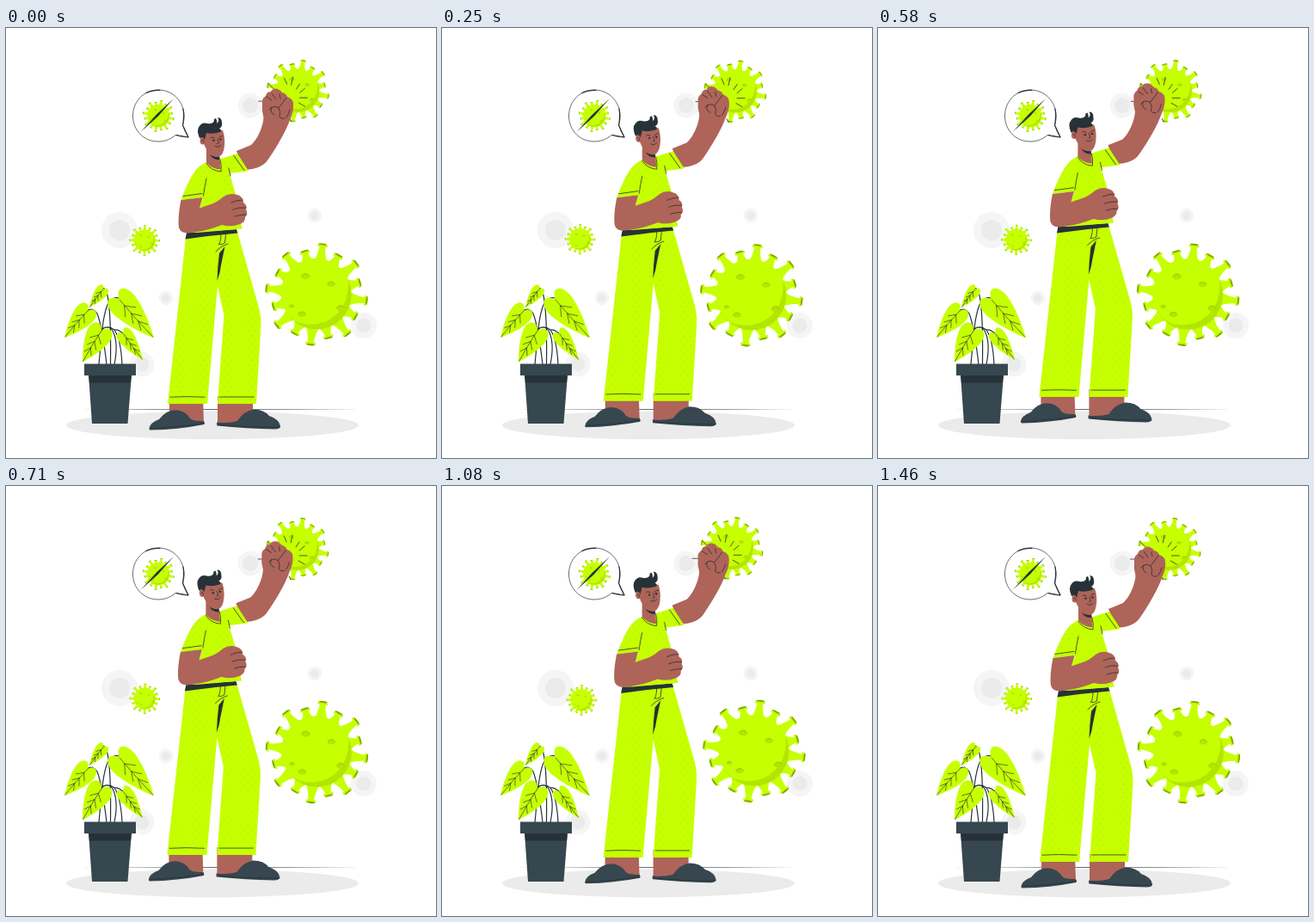
Recreate the animation shown at these times as an HTML page. Size 500 by 500 pixels, loop 1.5 s.

```html
<!DOCTYPE html>
<html lang="en">
<head>
<meta charset="utf-8">
<title>Fighting the virus</title>
<style>
html, body { margin: 0; width: 100%; height: 100%; overflow: hidden; background: #fff; }
svg { display: block; width: 100vw; height: 100vh; }
.lime { fill: #c6ff00; }
.skin { fill: #ae6459; }
.slate { fill: #37474f; }
.dark { fill: #263238; }
.line { fill: none; stroke: #263238; stroke-width: .8; stroke-linecap: round; stroke-linejoin: round; }
.bold { stroke-width: 1.2; }
.fine { stroke-width: .6; }
.shade { fill: #b2e600; }
.edge { fill: #83ac00; }
</style>
</head>
<body>
<svg viewBox="0 0 500 500" xmlns="http://www.w3.org/2000/svg">
  <defs>
    <pattern id="dots" width="8" height="10" patternUnits="userSpaceOnUse">
      <circle cx="2" cy="2" r=".5" fill="#a6d800"/>
      <circle cx="6" cy="7" r=".5" fill="#a6d800"/>
    </pattern>
  </defs>

  <ellipse cx="240" cy="462" rx="170" ry="16.3" fill="#ebebeb"/>
  <path class="dark" d="M86 443.400Q250 442.700 411 443.400Q250 444.100 86 443.400Z"/>
  <g id="bubbles"></g>

  <g id="plant">
    <path class="line bold" d="M121.500 391C122 355 121 325 118 311Q116 302 112 302.500M108 391C111 362 112 336 118 322Q124 310 135 315M117 391C114 365 111 345 106 332Q101 324 94 329M126 391C130 372 128 360 124 352Q118 344 110 352M135 391C134 372 131 358 126 351Q120 346 113 349M126 351Q130 350 136 355"/>
    <g id="leaves"></g>
    <path class="slate" d="M96 403H146L141.500 460H100Z"/>
    <path class="dark" d="M96 403H146L145 412.500H97Z"/>
    <path class="slate" d="M91 390.500H151V404H91Z"/>
  </g>

  <g>
    <path d="M205.500 113C212 92 198 72 177 72C160 72 147 86 147.500 103C148 120 161 132 177 132C185 132 192 129 197 124.500Q204 127 212 127Q208 121 205.500 113Z" fill="#fff" stroke="#263238" stroke-width=".7"/>
    <path class="line bold" d="M163 75.500Q170 72 179 72.300M206 94Q207.500 103 205.500 113L212 127L198 124.500"/>
    <g id="badge"></g>
    <path class="dark" d="M156.500 121L175 100.500L195 82L177 102.500Z"/>
  </g>

  <g id="small"></g>
  <g id="big"></g>
  <g id="top"></g>

  <g id="man">
    <path class="skin" d="M190 428H229L230 460H190ZM246 428H287V460H246Z"/>
    <path class="slate" d="M166.500 466Q167 459 178 455Q186 444.500 197 444.300Q209 445 214 454Q217 457.500 230 457Q231.500 459 230.500 461Q200 467 168 467.500Q166.500 467.500 166.500 466Z"/>
    <path class="slate" d="M245 458.500Q259 460 269 457Q277 445 288 443.500Q300 443.500 306 451Q318 455 319 463Q319 466.500 312 466.500Q280 466 245.500 462.500Z"/>
    <path class="line" d="M167.500 465.500Q200 464.500 230.500 459.500M245.500 461Q280 464.500 318.500 464"/>

    <path class="lime" d="M209 244L188 437H234L246 300L253.500 334L246 437H291L296.500 345Q297 334 292 318L269 237Z"/>
    <path fill="url(#dots)" d="M209 244L188 437H234L246 300L253.500 334L246 437H291L296.500 345Q297 334 292 318L269 237Z"/>
    <path class="dark" d="M254.500 254L248 262Q246 278 245.500 294Q249 285 250 276Z"/>
    <path class="line" d="M191 429.200Q210 428 231 429.200M248.500 429H288M250 240Q250 248 247.500 252M255.500 240L254.500 250Q249 253 248 251M244 260Q249 254 258 251"/>
    <path class="dark" d="M210 238L268 234L269.500 238.500Q240 241 208.500 245.500Z"/>

    <path class="skin" d="M299.500 104C299 115 292 130 285 136L268 143L277 165Q297 164 304 154C314 140 326 119 330 107C334 99 335 91 333.500 85Q331 81 327 80Q326 76 321 75Q318 70.500 313 70.500Q309 71 308 74Q303 74 302 79Q297 82 298 88Q297 96 299.500 104Z"/>
    <path class="line" d="M306 95Q311 89 317 93Q321 88 326 81M309 84L303 80M314 83L309 76M319 82L318 77M317 93Q320 97 318 103Q320 106 324 105M309 92Q306 98 312 101M330 95Q329 100 326 104"/>

    <path class="lime" d="M234 156C221 160 214 173 203.500 200L229 197L224 212L211 238H222L274.500 233.500L268 197L260 169L282 166L269 146L250 152Z"/>
    <path fill="url(#dots)" d="M234 156C221 160 214 173 203.500 200L229 197L224 212L211 238H222L274.500 233.500L268 197L260 169L282 166L269 146L250 152Z"/>
    <path class="line" d="M206 195.500L228 192.500M233 175Q231 184 229.500 195M265 148.500L277 165.500M259 163L261 172M233 157Q238 166 250 167Q251 160 249 153"/>
    <path class="skin" d="M203.500 200C201 212 200 224 201 232Q203 238.500 211 238.500C226 237.500 243 232.500 251 229Q262 232 272 228Q279 225 278 220Q282 216 279 211Q281 206 276 203Q276 196 269 194Q260 191 253 196Q245 203 238 205L225 209.500L228.500 197Z"/>
    <path class="line" d="M262 203Q268 200 275 200M264 211Q271 208 279 209M266 219Q272 217 279 217"/>

    <path class="skin" d="M233 140V156Q239 164 249.500 164.500L248 145Z"/>
    <path class="dark" d="M237 147Q242 151 248 149.500L248.500 153Q241 154 237 147Z"/>
    <path class="skin" d="M230 120L252 119Q255 128 254 137Q253 148 247 150Q238 150 234 142Q230 137 230 132Z"/>
    <ellipse class="skin" cx="229" cy="131" rx="3.500" ry="4.500"/>
    <path class="dark" d="M225 128Q221 118 225 114Q228 109 234 111Q240 112 242 108Q241 106 244 105Q246 109 245 111Q249 108 246 104Q251 104 251 110Q252 115 248 117Q252 119 249 121Q240 124 233 122L231 130Q229 125 226 128Z"/>
    <path class="line" d="M238 127.500Q240 126 242.500 128M247.500 127.500Q250 125 252 125.500M246 129L247.500 134L245.500 134.500M243 137.500Q247 140 250 136M228 130Q230 130 230 133"/>
    <circle class="dark" cx="241.500" cy="130.800" r="1.200"/>
    <circle class="dark" cx="249.500" cy="129.500" r="1.200"/>
  </g>
</svg>
<script>
const LOOP = 1500;
const $ = id => document.getElementById(id);

const spike = (angle, len) => `<g transform="rotate(${angle})">
  <path class="lime" d="M36 -10Q42 -4.500 ${len - 4} -3.400L${len - 3.5} -6Q${len} -7 ${len} 0Q${len} 7 ${len - 3.5} 6L${len - 4} 3.400Q42 4.500 36 10Z"/>
  <ellipse class="edge" cx="${len - .7}" cy="0" rx="1.100" ry="5"/></g>`;

const spot = (x, y, r) => `<ellipse class="shade" cx="${x}" cy="${y}" rx="${r}" ry="${r * .65}"/>
  <path d="M${x - r} ${y}Q${x} ${y - r * 1.3} ${x + r} ${y}" fill="none" stroke="#94bf00" stroke-width=".8"/>`;

// Centred on 0,0 with long and short spikes in turn
function virus(scale, turn) {
  let s = `<g transform="scale(${scale}) rotate(${turn})">`;
  for (let i = 0; i < 16; i++) s += spike(7 + i * 22.5, i % 2 ? 53 : 59.5);
  s += `<circle class="shade" r="40.500"/>
    <path class="lime" d="M37 -16A40.500 40.500 0 1 0 -25 31Q-8 39 12 31Q38 18 37 -16Z"/>`;
  return s + spot(-13, -21, 5) + spot(17, -12, 4.5) + spot(-17, 23, 4.5) + spot(28, 16, 5) + spot(-29, 14, 3) + '</g>';
}

// Heart-shaped leaf from stem (x, y) to tip (u, v)
function leaf(x, y, u, v, w) {
  const len = Math.hypot(u - x, v - y), a = Math.atan2(v - y, u - x) * 180 / Math.PI;
  const at = k => len * k;
  let veins = `M0 0Q${at(.5)} 1 ${at(.97)} 0`;
  for (const k of [.15, .35, .55]) {
    const h = w * (.6 - k * .5);
    veins += `M${at(k)} .500L${at(k + .17)} ${h}M${at(k)} .500L${at(k + .17)} ${-h}`;
  }
  return `<g transform="translate(${x} ${y}) rotate(${a})">
    <path class="lime" d="M0 0C${at(-.28)} ${-w * .4} ${at(-.12)} ${-w * 1.3} ${at(.25)} ${-w}C${at(.55)} ${-w * .8} ${at(.8)} ${-w * .35} ${len} 0C${at(.8)} ${w * .35} ${at(.55)} ${w * .8} ${at(.25)} ${w}C${at(-.12)} ${w * 1.3} ${at(-.28)} ${w * .4} 0 0Z"/>
    <path class="line fine" d="${veins}"/></g>`;
}

$('bubbles').innerHTML = [[132, 235, 21, 12], [284, 90, 14.5, 9], [359, 218, 8.5, 5],
  [186, 314, 8.5, 5], [158, 391, 14.5, 8.5], [416, 346, 15, 8.5]]
  .map(([x, y, r, q]) => `<circle cx="${x}" cy="${y}" r="${r}" fill="#f5f5f5"/><circle cx="${x}" cy="${y}" r="${q}" fill="#ebebeb"/>`).join('');

$('leaves').innerHTML = leaf(113, 304, 97, 325, 7) + leaf(132, 316, 172, 360.5, 15.5)
  + leaf(95, 329, 68, 360, 12) + leaf(111, 352, 89, 388.5, 14) + leaf(137, 356, 159, 386, 9);

$('badge').innerHTML = virus(.31, 4);
$('badge').setAttribute('transform', 'translate(177.300 102.300)');
$('small').innerHTML = virus(.295, -6);
$('big').innerHTML = virus(1, 0);
$('top').innerHTML = virus(.61, 3) + `<path class="line"
  d="M-16 -15L-13 -8M-6 -16L-8 -7M2 -8L-2 -2M8 -3L2 2M11 8H2M1 14L8 18M-35 -9L-28 -2M-46 12H-36M-10 32L-8 36"/>`;

const ease = k => (1 - Math.cos(Math.PI * Math.min(1, Math.max(0, k)))) / 2;
const move = (id, x, y, sy = 1) =>
  $(id).setAttribute('transform', `translate(${x.toFixed(3)} ${y.toFixed(3)}) scale(1 ${sy.toFixed(5)})`);

function draw(t) {
  const lift = ease(t / 570) - ease((t - 790) / 710);
  const sway = Math.cos(2 * Math.PI * (t - 330) / LOOP);
  move('man', -.6 * lift, -6 * lift, 1 - .0045 * lift);
  move('big', 361.4 - 1.6 * sway, 309.6 + 1.3 * sway);
  move('top', 339.2 + 2 * sway, 73 + .7 * sway);
  move('small', 161.4 - .9 * sway, 247.3 - 1.7 * sway);
}

function tick() {
  draw(performance.now() % LOOP);
  requestAnimationFrame(tick);
}
tick();
</script>
</body>
</html>
```
